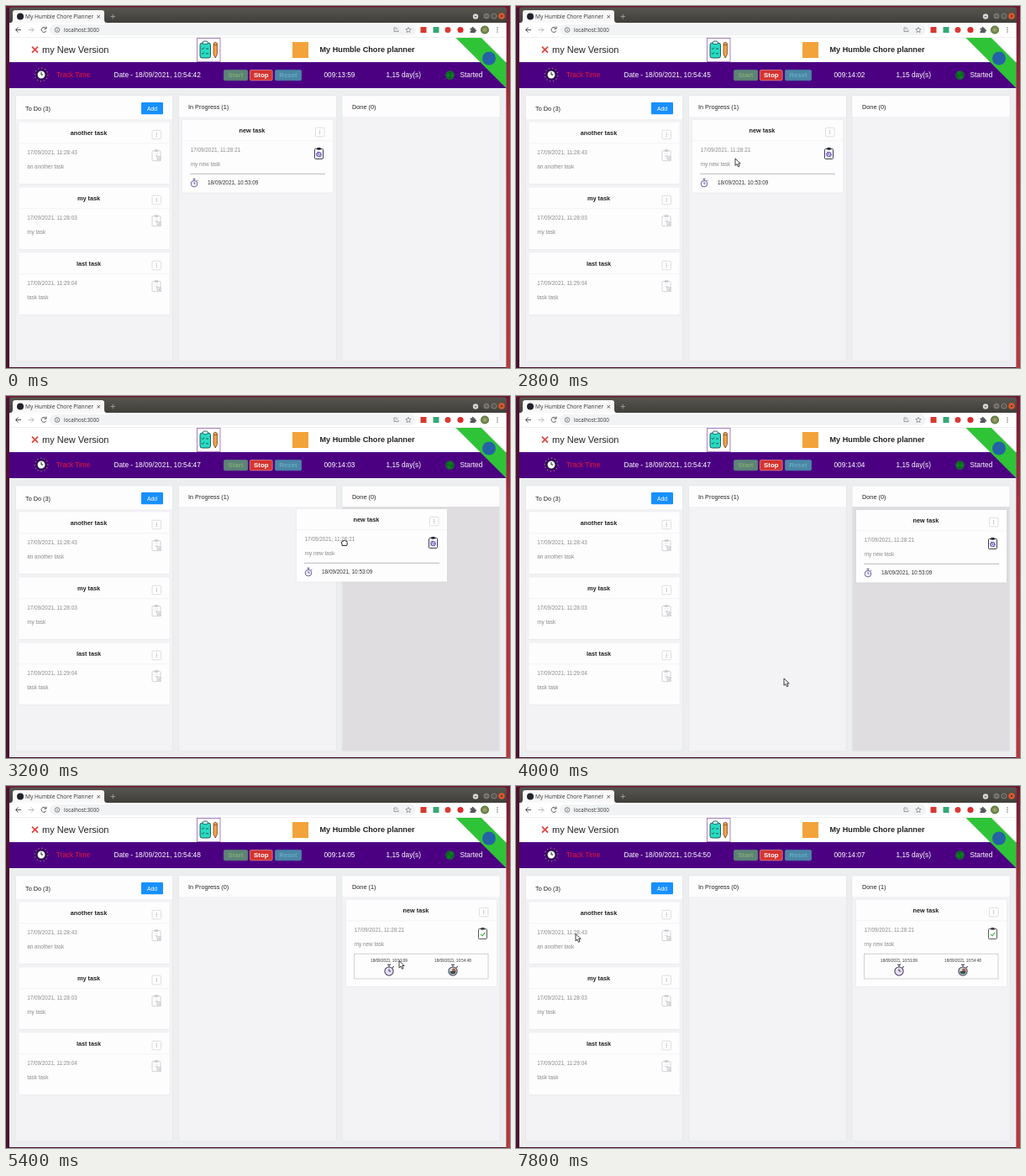
An HTML page that plays this animation: 600 by 432 pixels, repeating every 8 s.

```html
<!DOCTYPE html>
<html lang="en">
<head>
<meta charset="utf-8">
<title>Task board</title>
<style>
  html, body { margin: 0; width: 100%; height: 100%; overflow: hidden; background: #eceef0; }
  svg { display: block; width: 600px; height: 432px; font-family: "Liberation Sans", Arial, sans-serif; }
  .chrome { font-family: "Open Sans", "Noto Sans", sans-serif; }
</style>
</head>
<body>
<svg id="stage" viewBox="0 0 600 432"></svg>
<script>
const LOOP = 8000, STEP = 200;
const INDIGO = '#4b0082';

const rect = (x, y, w, h, fill, extra = '') =>
  `<rect x="${x}" y="${y}" width="${w}" height="${h}" fill="${fill}" ${extra}/>`;
const circle = (x, y, r, fill, extra = '') =>
  `<circle cx="${x}" cy="${y}" r="${r}" fill="${fill}" ${extra}/>`;
const path = (d, stroke, width = 1, fill = 'none', extra = '') =>
  `<path d="${d}" stroke="${stroke}" stroke-width="${width}" fill="${fill}" ${extra}/>`;
const text = (x, y, str, size, fill = '#222', extra = '') =>
  `<text x="${x}" y="${y}" font-size="${size}" fill="${fill}" ${extra}>${str}</text>`;
const group = (x, y, body, extra = '') =>
  `<g transform="translate(${x} ${y})" ${extra}>${body}</g>`;
const BOLD = 'font-weight="bold"', MIDDLE = 'text-anchor="middle"';

function desktop() {
  return `<defs>
      <linearGradient id="edge" x2="0" y2="1"><stop stop-color="#6e1a33"/><stop offset=".3" stop-color="#a8303a"/><stop offset="1" stop-color="#b5393c"/></linearGradient>
      <linearGradient id="titlebar" x2="0" y2="1"><stop stop-color="#58564f"/><stop offset="1" stop-color="#3f3e39"/></linearGradient>
      <radialGradient id="avatar"><stop stop-color="#b5a878"/><stop offset="1" stop-color="#4c7435"/></radialGradient>
      <filter id="shadow" x="-10%" y="-10%" width="120%" height="120%">
        <feDropShadow dx="0" dy="0.2" stdDeviation=".8" flood-opacity=".06"/></filter>
    </defs>` +
    rect(0, 0, 600, 432, '#4a1230') + rect(595.5, 0, 4.5, 432, 'url(#edge)') +
    rect(0, 0, 600, 2, '#6d1732') + rect(4, 20, 591.5, 411, '#eceef0') +
    rect(4, 1.5, 592, 19, 'url(#titlebar)', 'rx="3"');
}

function browser() {
  const tab = path('M5 20Q8 20 8 16V8Q8 5 11 5H114Q117 5 117 8V16Q117 20 120 20Z', 'none', 0, '#f8f8f9') +
    circle(17, 12.5, 4, '#20232a') +
    text(23, 15, 'My Humble Chore Planner', 6.6, '#333', 'class="chrome"') +
    path('M108.5 11l3.5 3.5m0-3.5l-3.5 3.5', '#555', .9) +
    path('M124.5 12.5h5.5m-2.75-2.75v5.5', '#aaa', .8);
  const windowButtons = circle(559, 12.5, 3.2, '#d6d6d6') + path('M557.8 12l1.2 1.3 1.2-1.3', '#333', .8) +
    circle(572, 12, 3.6, '#77756d') + circle(581, 12, 3.6, '#77756d') + circle(590, 12, 3.8, '#e2572b') +
    path('M570.5 12h3M579.7 10.7h2.6v2.6h-2.6zM588.7 10.7l2.6 2.6m0-2.6l-2.6 2.6', '#35342f', .8);
  const navigation = path('M18 28.5h-6.5m3-3l-3 3 3 3', '#555', 1) +
    path('M26.5 28.5h6.5m-3-3l3 3-3 3', '#bbb', 1) +
    path('M47.5 26.5a3 3 0 1 0 .4 3M48 24.5v2.7h-2.7', '#555', 1) +
    rect(52, 22, 436, 13, '#f1f3f4', 'rx="6.5"') +
    circle(61, 28.5, 2.8, 'none', 'stroke="#666" stroke-width=".8"') + path('M61 28v2M61 26.7v.8', '#666', .8) +
    text(69, 31, 'localhost:3000', 6.2, '#333', 'class="chrome"');
  const extensions = path('M465 26h-3v4.5h5v-2M464 28.7l2.5-2.5', '#777', .7) +
    path('M479 25.3l.9 2.1 2.3.2-1.7 1.6.5 2.3-2-1.2-2 1.2.5-2.3-1.7-1.6 2.3-.2z', '#777', .7) +
    rect(493.5, 25, 7, 7, '#d9382f') + rect(508.5, 25, 7, 7, '#36a878') +
    circle(526, 28.5, 3.5, '#d73b36') + circle(541, 28.5, 3.6, '#d92c2c') +
    path('M552.5 26.5h2q0-1.8 1.2-1.8t1.2 1.8h1.7v1.8q1.6 0 1.6 1.1t-1.6 1.1v1.4h-6.1v-1.8q1.4-.3 1.4-1t-1.4-.9z', 'none', 0, '#54565a') +
    circle(570, 28.5, 5, 'url(#avatar)') +
    [26, 28.5, 31].map(y => circle(585, y, .7, '#555')).join('');
  return tab + windowButtons + rect(4, 20, 591.5, 18, '#fff') + navigation + extensions +
    path('M4 37.7H595.5', '#ddd', .6);
}

function pageHeader() {
  const clipboardLogo = rect(227.5, 38.5, 27.5, 28, '#fff', 'stroke="#9560b4" stroke-width=".8"') +
    rect(231, 44, 12.5, 18, '#27dcc2', 'rx="2.5" stroke="#1d4a52" stroke-width=".9"') +
    rect(234.3, 42, 6, 3.6, '#c7f4f0', 'rx="1.5" stroke="#1d4a52" stroke-width=".8"') +
    path('M233 50.5l1.2 1.2 1.8-2.3M233 56.3l1.2 1.2 1.8-2.3M238 51h3M238 56.8h3', '#1d4a52', .9) +
    path('M247 44.5q2.2-2.6 4.4 0v13.2l-2.2 4.3-2.2-4.3z', '#6a4322', .8, '#f5a444') + path('M247 46.5h4.4', '#8c4c20', .8);
  const button = (x, w, label, fill, color, border = fill) =>
    rect(x + .4, 76.4, w - .8, 12.4, fill, `rx="1.5" stroke="${border}" stroke-width=".8"`) +
    text(x + w / 2, 85.2, label, 7.9, color, `${MIDDLE} ${BOLD}`);
  return rect(4, 38, 591.5, 29, '#fff') +
    path('M31 48.7l7 7m0-7l-7 7', '#dc4a45', 1.9) + text(43, 56, 'my New Version', 11, '#222') +
    clipboardLogo + rect(341, 43, 19, 19, '#f2a33a') +
    text(373.5, 55.2, 'My Humble Chore planner', 9.15, '#222', BOLD) +
    rect(4, 67, 591.5, 31, INDIGO) +
    text(60, 85.2, 'Track Time', 8.2, '#e81838') +
    button(259, 29, 'Start', '#5d8377', '#80aa72') + button(290, 27.5, 'Stop', '#d6342f', '#fff', '#e58a92') +
    button(320, 32, 'Reset', '#4b86a5', '#62abc0') +
    text(452.5, 85.2, '1,15 day(s)', 8.3, '#fff') + text(540.5, 85.2, 'Started', 8.3, '#fff') +
    path('M535.5 38H566L595.5 67.5V98Z', 'none', 0, '#2fc438') +
    path('M566.5 38L595.5 67', '#dcdfdc', 1) + circle(575, 62.5, 8, '#2463a6');
}

// Shared top part of every card, relative to the card's corner.
function cardTop(title, stamp, note, height, y = 0) {
  return rect(0, 0, 179, height, '#fefdfe', 'filter="url(#shadow)"') +
    text(83, 15.5 + y, title, 7.3, '#222', `${MIDDLE} ${BOLD}`) +
    path(`M0 ${25.3 + y}H179`, '#f1f0f3', .8) +
    rect(158.5, 9.8 + y, 10.5, 10.5, '#fff', 'rx="1" stroke="#d6d6d9" stroke-width=".8"') +
    [13.2, 15, 16.8].map(dy => circle(163.7, dy + y, .5, '#777')).join('') +
    text(9.7, 38.8 + y, stamp, 6.35, '#8c8c8c') + text(9.7, 55 + y, note, 6.4, '#8c8c8c');
}

const clipboard = (color, detail) =>
  rect(-5, -5.3, 10, 12, '#fff', `rx="1" stroke="${color}" stroke-width=".9"`) +
  rect(-2.3, -6.7, 4.6, 2.6, color, 'rx="1"') + detail;

const stopwatch = (color, face) =>
  circle(0, .8, 3.8, face, `stroke="${color}" stroke-width=".8"`) +
  path('M-1.5-5h3M0-5v2M3-2.4l1.2-1.2M0 .8V-1.2M0 .8h1.6', color, .8);

function todoCard(index, title, stamp, note) {
  const pointer = path('M-2.5-2h5M-2.5 .5h2.5', '#dcdce0', .7) +
    path('M0 .5l5.5 2-2 1 2.2 2.4-.9.8-2.2-2.4-1 1.7z', '#b9b9bd', .7, '#eee');
  return group(15.5, 138.5 + index * 78, cardTop(title, stamp, note, 73.5) +
    group(163.5, 39.5, clipboard('#cdcdd2', pointer)));
}

function activeCard() {
  const gear = circle(0, 1.3, 2.5, '#fff', 'stroke="#4527a0" stroke-width="1.7" stroke-dasharray="1.3 .6"') + circle(0, 1.3, .8, '#4527a0');
  return cardTop('new task', '17/09/2021, 11:28:21', 'my new task', 86.5, -.5) +
    group(162.5, 39.8, clipboard('#222a3c', gear)) +
    path('M9 64.3H170', '#b2b2b6', .9) +
    group(14, 75.3, stopwatch('#4a3f80', '#f4f1ff')) +
    text(30, 77.3, '18/09/2021, 10:53:09', 6.4, '#333');
}

function finishedCard() {
  const lap = (x, stamp, face, detail = '') => text(x, 74.2, stamp, 4.65, '#333', MIDDLE) +
    group(x, 84, `<g transform="scale(1.35)">${stopwatch('#45445c', face)}${detail}</g>`);
  const elapsed = path('M-2.6 .8H2.6A2.6 2.6 0 0 1-2.6 .8Z', 'none', 0, '#3d4c4c') +
    path('M0 .8V-1.8A2.6 2.6 0 0 1 2.6 .8Z', 'none', 0, '#b8544c');
  return cardTop('new task', '17/09/2021, 11:28:21', 'my new task', 103, -.5) +
    group(162.5, 39.8, clipboard('#444', path('M-2.5 1l2 2 3.3-4', '#39a845', 1.1))) +
    rect(9.5, 64.3, 159.5, 29.7, '#fefdfe', 'stroke="#c6c6ca" stroke-width=".8"') +
    lap(51, '18/09/2021, 10:53:09', '#e6def5') + lap(127, '18/09/2021, 10:54:48', '#c9d8d0', elapsed);
}

function board() {
  const column = (x, w, headerHeight, id) =>
    rect(x, 107.5, w, 316, '#f3f2f5', `id="${id}" filter="url(#shadow)"`) + rect(x, 107.5, w, headerHeight, '#fefdfe');
  return column(12, 186, 27.5, 'todo') + column(206, 187, 24.5, 'progress') + column(400.5, 187, 24.5, 'done') +
    text(23, 125, 'To Do (3)', 7.3) +
    rect(161, 115, 26, 14.3, '#1890ff', 'rx="1"') + text(174, 124.5, 'Add', 6.8, '#fff', MIDDLE) +
    todoCard(0, 'another task', '17/09/2021, 11:28:43', 'an another task') +
    todoCard(1, 'my task', '17/09/2021, 11:28:03', 'my task') +
    todoCard(2, 'last task', '17/09/2021, 11:29:04', 'task task');
}

function movingParts() {
  return text(128.5, 85.2, '', 8.3, '#fff', 'id="date"') + text(378.5, 85.2, '', 8.3, '#fff', 'id="elapsed"') +
    circle(42, 82, 7.8, 'none', 'id="clockRing" stroke="#a98a62" stroke-width="1.2" stroke-dasharray="1.1 2.98"') +
    circle(42, 82, 5.2, '#fff', 'stroke="#1c1838" stroke-width="1.5"') + path('M42 78.8V82H44.3', '#222', 1) +
    circle(528.5, 82.5, 5.2, '#0c7c24') +
    `<g id="status">${path('M524.5 81q4-4 8 0M524.5 84q4 4 8 0M528.5 78v9', '#075018', .8)}</g>` +
    text(217, 123, '', 7.3, '#222', 'id="progressTitle"') + text(412, 123, '', 7.3, '#222', 'id="doneTitle"') +
    `<g id="activeCard">${activeCard()}</g>` + group(405, 136, finishedCard(), 'id="finishedCard"') +
    `<g id="cursor"><g id="arrow">${path('M0 0V8.4L2 6.6 3.4 9.8 5 9.1 3.6 6H6.2Z', '#111', .8, '#fff')}</g>
     <g id="hand">${path('M-3 3.5V1L-4 0Q-4-1.4-2.4-1Q-2.2-2.8-.8-2.2Q.5-3.2 1.3-2Q3.2-2.4 3.2-.4V2L2.6 3.5Z', '#111', .9, '#fff')}</g></g>`;
}

const byId = id => document.getElementById(id);
byId('stage').innerHTML = desktop() + browser() + pageHeader() + board() + movingParts();

// Moments at which the displayed seconds advance.
const dateTicks = [200, 1000, 2000, 3000, 3200, 4600, 5800, 7000];
const elapsedTicks = [400, 1000, 2000, 3200, 3800, 4800, 6000, 7000];
const countPassed = (ticks, t) => ticks.filter(at => t >= at).length;

// Rows of time, x, y.
const cursorPath = [
  [1800, 300, 135], [2400, 261, 182], [2800, 261, 182], [3000, 285, 176], [3200, 403, 175], [3400, 458, 176],
  [3600, 452, 196], [4000, 319, 337], [4400, 365, 290], [4800, 455, 213], [5400, 468, 208.5],
  [6000, 468, 208.5], [7200, 75, 180], [7400, 71, 176.5], [8000, 71, 176.5]];
const cardPath = [[2800, 210, 136], [3000, 228, 136], [3200, 346, 135], [3400, 401, 136], [3600, 405, 136]];

function pointAt(points, t) {
  if (t <= points[0][0]) return points[0].slice(1);
  const next = points.findIndex(p => p[0] >= t);
  if (next < 0) return points.at(-1).slice(1);
  const [t0, x0, y0] = points[next - 1], [t1, x1, y1] = points[next];
  const k = (t - t0) / (t1 - t0);
  return [x0 + (x1 - x0) * k, y0 + (y1 - y0) * k];
}

const place = (id, [x, y]) => byId(id).setAttribute('transform', `translate(${x} ${y})`);
const show = (id, visible) => byId(id).setAttribute('visibility', visible ? 'visible' : 'hidden');
const spin = (id, angle, x, y) => byId(id).setAttribute('transform', `rotate(${angle} ${x} ${y})`);

function draw(now) {
  const t = Math.floor(now % LOOP / STEP) * STEP;
  const finished = t >= 4600, dragging = t >= 3000 && t < 3600;
  const seconds = 59 + countPassed(elapsedTicks, t);

  byId('date').textContent = `Date - 18/09/2021, 10:54:${42 + countPassed(dateTicks, t)}`;
  byId('elapsed').textContent = `009:${13 + Math.floor(seconds / 60)}:${String(seconds % 60).padStart(2, '0')}`;
  byId('progressTitle').textContent = `In Progress (${finished ? 0 : 1})`;
  byId('doneTitle').textContent = `Done (${finished ? 1 : 0})`;
  byId('progress').setAttribute('fill', t === 3000 ? '#dfdde0' : '#f3f2f5');
  byId('done').setAttribute('fill', t >= 3200 && !finished ? '#dfdde0' : '#f3f2f5');

  show('activeCard', !finished);
  show('finishedCard', finished);
  place('activeCard', pointAt(cardPath, t));
  place('cursor', pointAt(cursorPath, t));
  show('arrow', t >= 1800 && !dragging);
  show('hand', dragging);
  spin('clockRing', t * .045, 42, 82);
  spin('status', t * .09, 528.5, 82.5);
  requestAnimationFrame(() => draw(performance.now()));
}
draw(0);
</script>
</body>
</html>
```
